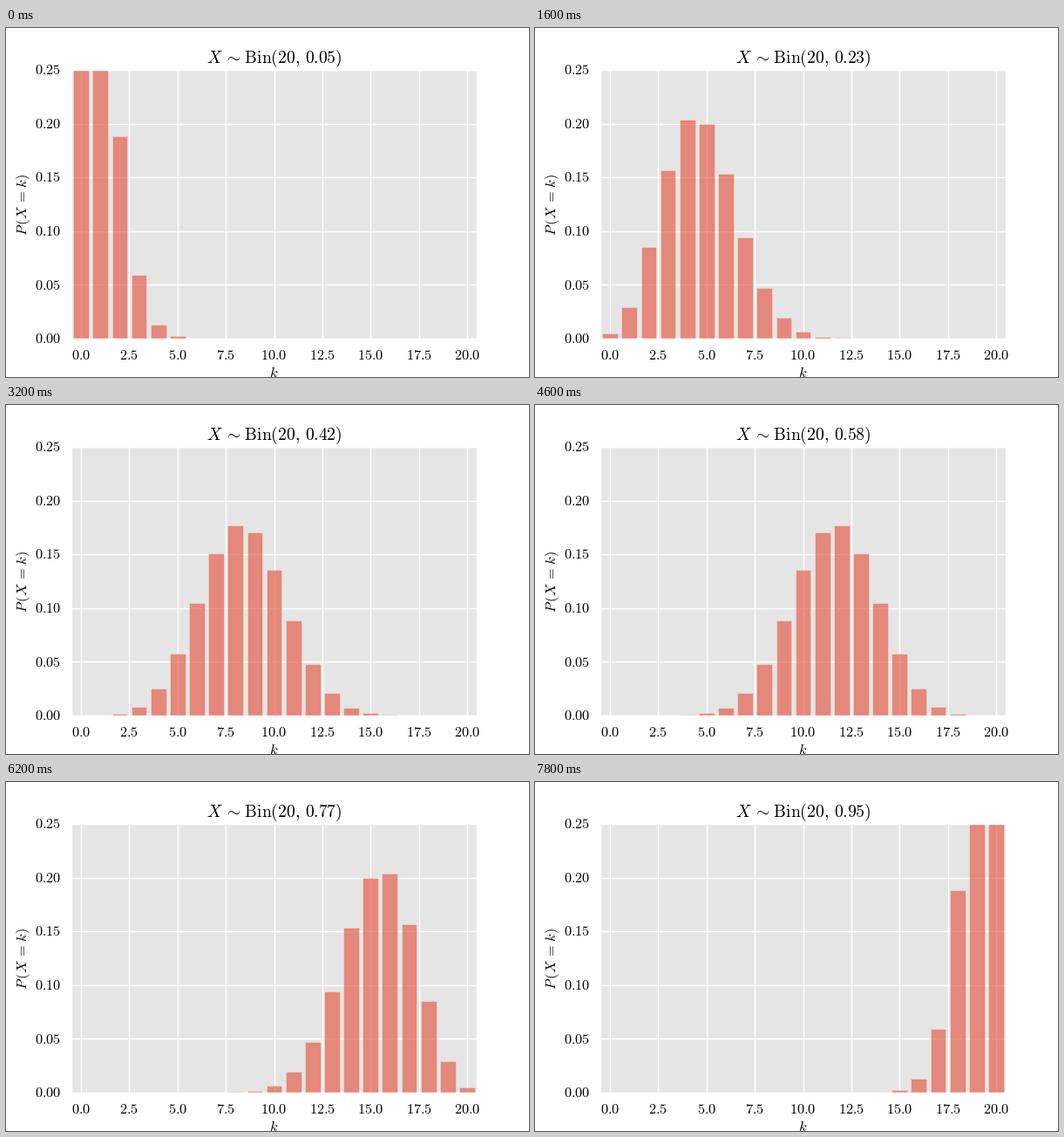
Write a matplotlib script that moves like this. It is 600 by 400 pixels and loops after 8 s.

```python
from math import comb

import matplotlib.pyplot as plt
import numpy as np
from matplotlib.animation import FuncAnimation

W, H, DPI = 600, 400, 100
N, FRAMES, INTERVAL = 20, 40, 200
LABEL_SIZE, TITLE_SIZE = 11.75, 14.1

plt.rcParams["mathtext.fontset"] = "cm"

k = np.arange(N + 1)
coeff = np.array([comb(N, i) for i in k], dtype=float)
probs = np.linspace(0.05, 0.95, FRAMES)


def pmf(p):
    return coeff * p**k * (1 - p) ** (N - k)


def title_text(p):
    return (r"$X\hspace{0.2}\sim\hspace{0.117}"
            rf"\mathrm{{Bin(20,}}\hspace{{0.18}}\mathrm{{{p:.2f})}}$")


fig = plt.figure(figsize=(W / DPI, H / DPI), dpi=DPI, facecolor="white")
ax = fig.add_axes([0.125, 0.11, 0.775, 0.77], facecolor="#E5E5E5")
ax.set(xlim=(-0.5, 20.5), ylim=(0, 0.25))
ax.set_axisbelow(True)
ax.grid(color="white", linewidth=1)
for spine in ax.spines.values():
    spine.set(color="white", linewidth=1)

xticks = np.arange(0, 20.1, 2.5)
yticks = np.arange(6) * 0.05
ax.set_xticks(xticks)
ax.set_yticks(yticks)
ax.tick_params(length=0, labelbottom=False, labelleft=False)


def put(x, y, text, ha="center", **kw):
    """Write text with its baseline at pixel (x, y), y counted from the top."""
    fig.text(x / W, 1 - y / H, text, ha=ha, va="baseline",
             fontsize=LABEL_SIZE, color="black", **kw)


for t in xticks:
    put(75 + (t + 0.5) * 465 / 21, 380.3, rf"$\mathrm{{{t:.1f}}}$")
for t in yticks:
    put(63.2, 361.3 - t / 0.25 * 308, rf"$\mathrm{{{t:.2f}}}$", ha="right")
put(307.5, 400, "$k$")
put(24.5, 202, r"$P\hspace{0.16}(X\hspace{0.2}=\hspace{0.117}k\hspace{0.035})$",
    rotation=90, rotation_mode="anchor")

title = ax.set_title(title_text(probs[0]), fontsize=TITLE_SIZE,
                     color="black", pad=6)
bars = ax.bar(k, pmf(probs[0]), width=0.8, color="#E24A33", alpha=0.6,
              edgecolor="#EEEEEE", linewidth=0.5)
ax.set(xlim=(-0.5, 20.5), ylim=(0, 0.25))


def update(i):
    p = probs[i]
    for bar, height in zip(bars, pmf(p)):
        bar.set_height(height)
    title.set_text(title_text(p))
    return [*bars, title]


anim = FuncAnimation(fig, update, frames=FRAMES, interval=INTERVAL,
                     repeat=True, repeat_delay=0, blit=False)
plt.show()
```
